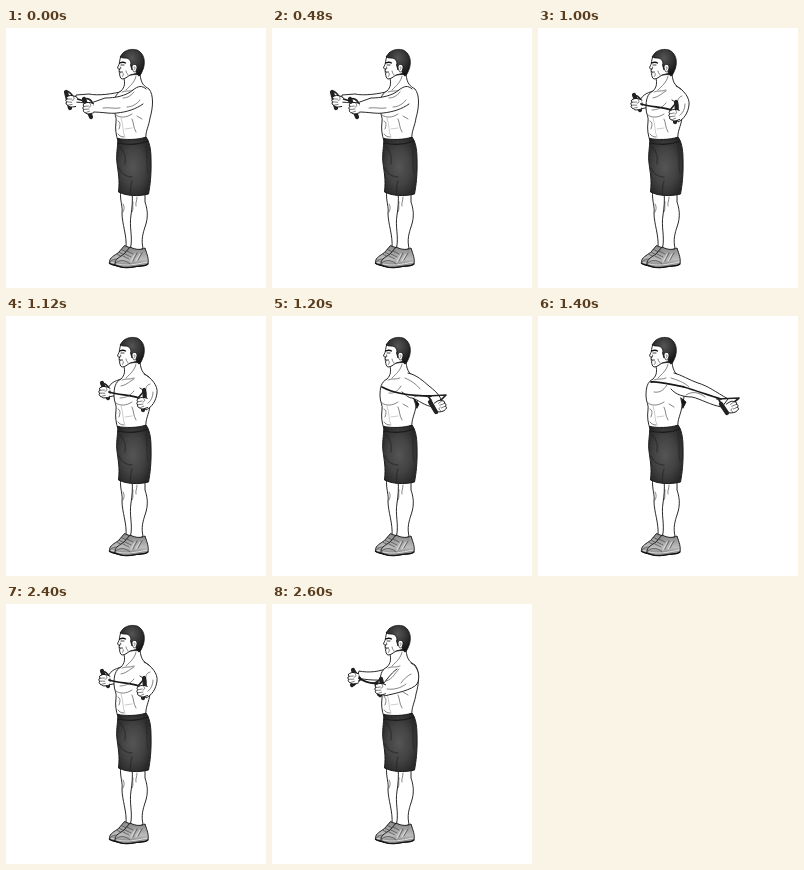
Recreate the animation shown at these times as an HTML page. Size 260 by 260 pixels, loop 2.8 s.

```html
<!DOCTYPE html>
<html lang="en">
<head>
<meta charset="utf-8">
<title>Chest fly with a band</title>
<style>
  html, body { margin: 0; width: 100%; height: 100%; overflow: hidden; background: #fff; }
  /* defaults are inherited, so a path's own attributes win */
  svg {
    display: block; width: 100vw; height: 100vh;
    fill: none; stroke: #111; stroke-width: .9; stroke-linecap: round; stroke-linejoin: round;
  }
  .skin { fill: #fff; }
  .thin { stroke: #333; stroke-width: .6; }
  .soft { stroke: #aaa; stroke-width: .6; }
  .band { stroke: #191919; stroke-width: 1.8; }
  .grip { stroke: #222; stroke-width: 4.2; }
  .strap { stroke: #222; stroke-width: 1.7; }
  .dark { fill: #151515; }
</style>
</head>
<body>
<svg viewBox="0 0 260 260" xmlns="http://www.w3.org/2000/svg">
  <defs>
    <radialGradient id="cloth" gradientUnits="userSpaceOnUse" cx="127" cy="139" r="34" gradientTransform="translate(127 139) scale(.62 1) translate(-127 -139)">
      <stop offset="0" stop-color="#555"/>
      <stop offset=".55" stop-color="#424242"/>
      <stop offset="1" stop-color="#262626"/>
    </radialGradient>
    <radialGradient id="hair" cx=".48" cy=".32" r=".65">
      <stop offset="0" stop-color="#555"/>
      <stop offset=".55" stop-color="#343434"/>
      <stop offset="1" stop-color="#151515"/>
    </radialGradient>
    <linearGradient id="shoe" x1="0" y1="0" x2="0" y2="1">
      <stop offset="0" stop-color="#858585"/>
      <stop offset=".6" stop-color="#bcbcbc"/>
      <stop offset="1" stop-color="#777"/>
    </linearGradient>
    <!-- closed fist, knuckles to the left -->
    <g id="fist">
      <path class="skin" d="M5 -5 C2 -6 -2 -6 -4 -4 C-6 -3 -5 -1 -4 -1 C-6 0 -5 2 -4 2 C-5 4 -3 5 -2 5 C0 7 4 5 6 4"/>
      <path class="thin" d="M-4 -1 L0 -2 M-4 2 L1 1 M-2 5 L2 3 M1 -5 C3 -3 3 -2 1 -1"/>
    </g>
    <g id="shoeShape">
      <path d="M109 235 C109 231 114 229 118 226 L124 219 C130 222 135 222 139 220 C141 226 143 231 142 236 C138 239 132 238 127 239 C121 240 113 240 109 237Z" fill="url(#shoe)"/>
      <path stroke="#ddd" stroke-width="1" d="M111 236 C119 238 128 237 141 234 M125 234 L129 226 M130 233 L134 226"/>
      <path class="thin" d="M117 228 L123 231 M119 226 L125 229 M121 223 L127 226 M110 235 C114 231 120 232 124 236 M127 233 L131 225 M132 232 L136 225"/>
      <path stroke-width="1.1" d="M109 237 C116 240 124 240 128 239 C134 237 139 239 142 236"/>
    </g>
  </defs>

  <g id="legs">
    <path class="skin" d="M114.500 163 C114 174 117 179 116 185 C116 196 121 207 120 220 L128 221 L130 165Z"/>
    <use href="#shoeShape" x="-5.500" y="-1.500"/>
    <path class="skin" d="M126 164 C127 173 126 180 125 187 C123 199 127 209 124.500 220 C129 223 134 223 137 220 C135 212 137 205 139 199 C143 188 141 180 139 174 L139 166Z"/>
    <path class="thin" d="M117 176 C119 179 118 182 117 184 M127 174 C126 178 128 181 126 184 M131 169 C131 173 129 176 130 178"/>
    <use href="#shoeShape"/>
  </g>

  <g id="poses"></g>

  <g id="shorts">
    <path stroke="#1c1c1c" stroke-width="1" fill="url(#cloth)" d="M112 110.500 C119 112 132 112 140 109 C143 113 145 120 145 131 C145.500 147 144 158 142.500 166 C133 168.500 120 168 112.500 164 C114 151 112 144 111 135 C110 127 111.500 121 112 110.500Z"/>
    <path stroke="#1c1c1c" stroke-width="1.200" d="M112 115 C121 117 132 117 142 113"/>
    <path stroke="#262626" stroke-width="1.300" opacity=".6" d="M114 119 C119 124 120 128 119 136 M113 140 C116 147 121 149 126 149 M140 118 C142 128 140 136 142 145 M126 153 C124 158 125 163 124 167"/>
  </g>

  <g id="head">
    <path class="skin" d="M115 28 C114 31 113.500 33 113.500 35 C113 37 111.500 39 111.500 40 C112 41 113 41 113.500 41 L113 43 L114 44.500 L113.500 46 C114 48 114 50 116 51 C119 51 121 49 124 47 L132 45 L131 27Z"/>
    <path stroke-width=".8" fill="url(#hair)" d="M114.500 29 C116 23 124 20 131 22 C138 25 139.500 33 137.500 40 C136 44 135 47 133 48 C131 47 130 45 130 43 L130.500 37 C128 36 127 38 126 42 L124.500 37 C126 33 123 30 119 30 C117 30 116 30 114.500 29Z"/>
    <path class="skin" stroke-width=".7" d="M126 38 C127 35.500 131 36 131 39 C131 42 129 45 127.500 43.500 C126.500 42 126 40 126 38Z"/>
    <path class="thin" d="M128 39 C129.500 38 129.500 41 128 42 M117 45 C118 46 117 48 116.500 48.500 M120 43 C120 45 122 46 122 47"/>
    <path stroke-width="1.300" d="M113.500 35 C116 34 118 34 119.500 35"/>
    <path stroke-width=".8" d="M115 37 L118 37 M113 44 L116.500 44 M113.500 41 C115 41.500 115 40 114.500 39"/>
  </g>
</svg>

<script>
const path = (d, kind = '') => `<path class="${kind}" d="${d}"/>`;
const skin = d => path(d, 'skin');
const thin = d => path(d, 'thin');
const soft = d => path(d, 'soft');
const band = d => path(d, 'band');
const grip = d => path(d, 'grip');
const strap = d => path(d, 'strap');
const fist = (x, y, turn = 0, size = 1) =>
  `<use href="#fist" transform="translate(${x} ${y}) rotate(${turn}) scale(${size})"/>`;

const torso = skin('M118 50 C119 55 119 59 115 63 C109 66 108 72 108 80 C108 86 111 89 110 94 C109 101 110 107 112 113 L140 111 C139 104 143 98 144 90 C147 80 148 67 143 61 C138 58 135 56 134 46 L124 47Z')
  + thin('M130 48 C129 54 124 58 120 62 M116 64 C120 62 124 64 128 62 M112 106 C113 108 116 109 118 109')
  + thin('M110 87 C114 90 120 90 126 86 M112 93 C115 94 114 98 113 101 M126 91 C128 95 127 99 130 104 M131 88 L136 91')
  + soft('M115 90 C118 98 116 103 119 109 M119 101 L126 100');

const poses = [
  // arms straight ahead
  skin('M118 63 C107 66 92 68 83 66 L70 67 L69 74 C83 75 101 78 118 76')
  + grip('M60 64 L64 80') + strap('M59 64 C62 62 66 66 67 69')
  + band('M65 69 L78 73') + fist(65, 73, 16)
  + torso
  + skin('M140 61 C136 57 132 58 127 62 C120 68 109 70 99 70 L85 75 L86 84 C97 84 104 86 111 85 C121 84 130 81 137 76')
  + thin('M128 64 C125 68 121 70 117 70 M134 72 C131 76 126 79 121 79 M114 80 C108 81 103 79 97 80')
  + grip('M78 71 L85 89') + strap('M77 73 C81 68 86 72 87 77')
  + fist(82, 80, 8),

  // elbows starting to bend
  skin('M116 63 C110 68 96 69 87 67 L85 74 C94 76 108 77 119 75')
  + grip('M81 66 C83 71 83 77 80 81') + strap('M82 66 L89 75 L82 81')
  + fist(81, 74, 10) + torso
  + band('M87 74 C94 79 99 80 106 79')
  + skin('M139 59 C146 62 149 73 145 80 C140 86 125 89 112 92 L110 81 C115 76 118 70 125 65')
  + thin('M127 65 C122 70 121 75 114 77 M139 70 C135 72 132 75 129 79 M134 80 C129 84 122 86 115 85')
  + strap('M103 79 L109 75 M103 79 L106 91') + grip('M109 75 C111 80 110 87 108 91')
  + fist(108, 85, 8),

  // hands at the chest, elbows wide
  skin('M116 63 C107 65 104 68 101 74 L102 81 L118 78')
  + torso + grip('M96 67 L102 82') + strap('M96 67 C102 68 103 72 104 77')
  + fist(98, 76, 12) + band('M103 76 C113 79 124 79 133 82')
  + skin('M138 58 C146 62 152 70 151 77 C150 85 146 91 140 94 L136 84 C141 81 140 75 134 72')
  + thin('M128 63 C124 65 121 69 115 70 M144 68 C140 69 139 73 140 77 M147 76 C147 81 145 85 141 88 M128 75 C124 80 119 82 114 82')
  + strap('M132 82 L139 74 M132 82 L137 94') + grip('M138 74 C140 82 138 89 137 94')
  + fist(136, 87, 4),

  // arms opening behind
  torso
  + skin('M136 57 C145 59 151 65 157 70 C162 74 166 77 169 83 L162 91 C152 90 147 84 140 82 C136 82 133 78 130 76')
  + thin('M133 62 C140 65 145 69 148 73 M142 81 C148 78 154 79 160 84 M129 70 C126 75 122 78 117 77')
  + path('M142 83 L147 88 L145 92Z', 'dark')
  + band('M110 71 C121 77 136 80 159 80')
  + strap('M156 80 L174 79 L167 86 M157 81 L165 97')
  + fist(169, 90, 170) + grip('M158 86 L164 96'),

  // arms fully open
  torso
  + skin('M136 57 C144 59 151 64 160 67 C170 70 178 76 190 83 L184 91 C172 89 163 83 154 81 C146 81 138 79 133 73')
  + thin('M133 62 C139 64 146 66 151 71 M148 79 C154 75 161 76 167 81 M129 69 C125 75 121 77 116 76')
  + path('M143 82 L148 86 L145 92Z', 'dark')
  + band('M113 66 C122 65 133 69 146 71 C159 75 170 79 183 83')
  + strap('M179 83 L201 82 L194 88 M181 84 L189 98')
  + fist(195, 91, 170) + grip('M183 88 L189 97')
];

// start time of each step, and the pose it shows
const steps = [[0, 0], [800, 1], [1000, 2], [1200, 3], [1400, 4], [2400, 2], [2600, 1]];
const loop = 2800;

const stage = document.getElementById('poses');
stage.innerHTML = poses.map(p => `<g>${p}</g>`).join('');
const groups = [...stage.children];

function draw(time) {
  const t = time % loop;
  const shown = steps.filter(([start]) => start <= t).pop()[1];
  groups.forEach((g, i) => { g.style.display = i === shown ? 'inline' : 'none'; });
}

const begin = performance.now();
function tick() {
  draw(performance.now() - begin);
  requestAnimationFrame(tick);
}
tick();
</script>
</body>
</html>
```
